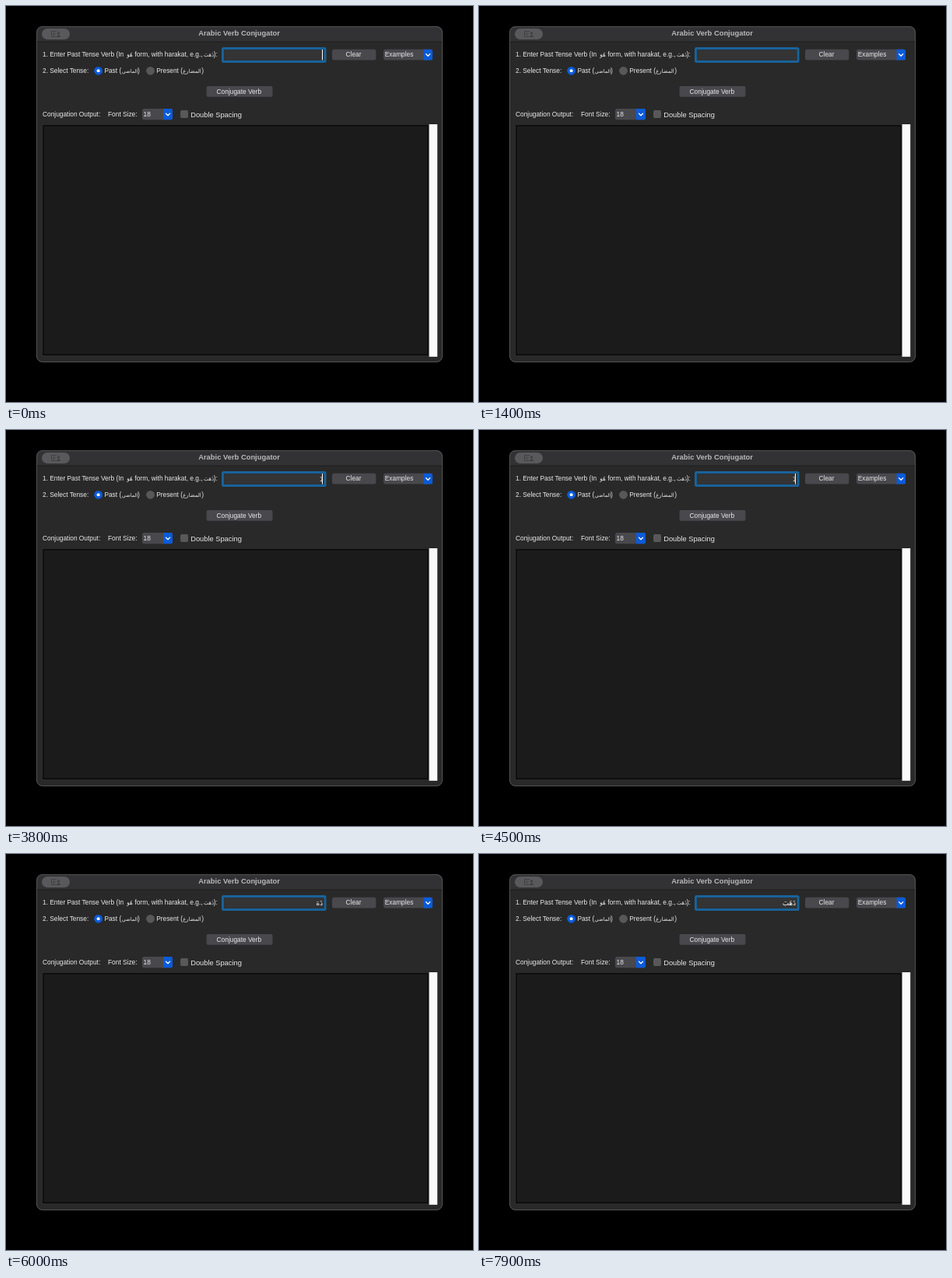
Recreate the animation shown at these times as an HTML page. Size 600x509 px, loop 8000 ms.

```html
<!DOCTYPE html>
<html lang="en">
<head>
<meta charset="utf-8">
<title>Arabic Verb Conjugator</title>
<style>
  html, body { margin: 0; width: 100%; height: 100%; overflow: hidden; background: #000; }
  svg { display: block; }
  text { font: 8.35px "Liberation Sans", Arial, sans-serif; fill: #e9e9e9; white-space: pre; }
  .title { font-size: 9.38px; font-weight: bold; fill: #b9b8ba; }
  .wide { font-size: 9.3px; }
  .ar { font-family: "DejaVu Sans", sans-serif; direction: rtl; text-anchor: middle; }
  .typed text { font: 8.7px "DejaVu Sans", sans-serif; direction: rtl; text-anchor: start; fill: #fff; }
  .button { fill: #49484d; }
  .blue { fill: #0b5bd9; }
  .off { fill: #58585a; }
  .arrow { fill: none; stroke: #fff; stroke-width: 1.3; stroke-linecap: round; stroke-linejoin: round; }
  .typed { animation: type 8s step-end infinite; }
  .caret { fill: #fff; animation: blink 8s step-end infinite; }

  /* each row of the strip is one more keystroke */
  @keyframes type {
    0% { transform: translateY(0); }
    25% { transform: translateY(-20px); }
    43.75% { transform: translateY(-40px); }
    60% { transform: translateY(-60px); }
    68.75% { transform: translateY(-80px); }
    77.5% { transform: translateY(-100px); }
    95%, 100% { transform: translateY(-120px); }
  }
  @keyframes blink {
    0%, 10%, 21.25%, 32.5%, 42.5%, 53.75%, 66.25%, 76.25%, 87.5% { opacity: 1; }
    6.25%, 17.5%, 28.75%, 38.75%, 50%, 61.25%, 72.5%, 83.75%, 95%, 100% { opacity: 0; }
  }
</style>
</head>
<body>
<svg width="600" height="509" viewBox="0 0 600 509">
  <defs>
    <clipPath id="frame"><rect x="39" y="26" width="522" height="432" rx="8"/></clipPath>
    <path id="chevron" class="arrow" d="M-2.5 -1.2L0 1.3L2.5 -1.2"/>
  </defs>

  <!-- window -->
  <g clip-path="url(#frame)">
    <rect x="39" y="26" width="522" height="432" fill="#292929"/>
    <rect x="39" y="26" width="522" height="20" fill="#323134"/>
    <rect x="39" y="45.5" width="522" height="1" fill="#1c1c1d"/>
  </g>
  <rect x="39.5" y="26.5" width="521" height="431" rx="7.5" fill="none" stroke="#515153"/>
  <rect x="46" y="29" width="36" height="14" rx="7" fill="#59585b"/>
  <g fill="none" stroke="#403f42" stroke-width=".9">
    <path d="M65 32.5H58.5V39.5H64M60 35H63.5M60 37H63"/>
    <circle cx="67.5" cy="35" r="1.2" fill="#403f42"/>
    <path d="M65 39.5Q67.5 35.8 70 39.5Z" fill="#403f42"/>
  </g>
  <text class="title" x="247.2" y="38.2">Arabic Verb Conjugator</text>

  <!-- verb row -->
  <text x="47" y="65.3">1. Enter Past Tense Verb (In</text>
  <text class="ar" x="159" y="65.3" style="font-size:7.2px">هُوَ</text>
  <text x="165.4" y="65.3">form, with harakat, e.g.,</text>
  <text class="ar" x="260.6" y="65.3" style="font-size:6.8px">ذَهَبَ</text>
  <text x="266.8" y="65.3">):</text>

  <rect x="278.5" y="54.5" width="131.5" height="17" rx="1" fill="#343434" stroke="#19639a" stroke-width="3"/>
  <rect x="280.3" y="56.3" width="127.9" height="13.4" fill="none" stroke="#28323a" stroke-width=".7"/>
  <svg x="280" y="55" width="129" height="16" overflow="hidden">
    <g class="typed">
      <text x="127" y="31">ذ</text>
      <text x="127" y="51">ذَ</text>
      <text x="127" y="71">ذَه</text>
      <text x="127" y="91">ذَهَ</text>
      <text x="127" y="111">ذَهَب</text>
      <text x="127" y="131">ذَهَبَ</text>
    </g>
  </svg>
  <rect class="caret" x="406" y="56" width="1" height="13.5"/>

  <rect class="button" x="419" y="55.8" width="56.3" height="13.7" rx="2.5"/>
  <text x="436.6" y="65.3">Clear</text>
  <rect class="button" x="485" y="55.8" width="63" height="13.7" rx="2.5"/>
  <path class="blue" d="M536.5 55.8h9a2.5 2.5 0 0 1 2.5 2.5v8.7a2.5 2.5 0 0 1 -2.5 2.5h-9z"/>
  <use href="#chevron" x="542.2" y="63"/>
  <text x="486.8" y="65.3">Examples</text>

  <!-- tense row -->
  <text x="47" y="86.2">2. Select Tense:</text>
  <circle class="blue" cx="118.6" cy="83.3" r="5.4"/>
  <circle cx="118.6" cy="83.3" r="2" fill="#fff"/>
  <text x="126.4" y="86.2">Past (</text>
  <text class="ar" x="159" y="86.2" style="font-size:6.5px">الماضي</text>
  <text x="169" y="86.2">)</text>
  <circle class="off" cx="185.5" cy="83.3" r="5.4"/>
  <text x="193.2" y="86.2">Present (</text>
  <text class="ar" x="239" y="86.2" style="font-size:6.9px">المضارع</text>
  <text x="251.2" y="86.2">)</text>

  <rect class="button" x="257.5" y="103" width="85" height="13.7" rx="2.5"/>
  <text x="270.6" y="112.6">Conjugate Verb</text>

  <!-- output row -->
  <text x="47" y="142">Conjugation Output:</text>
  <text x="131" y="142">Font Size:</text>
  <rect class="button" x="175" y="132" width="39" height="14.3" rx="2.5"/>
  <path class="blue" d="M202 132h9.5a2.5 2.5 0 0 1 2.5 2.5v9.3a2.5 2.5 0 0 1 -2.5 2.5h-9.5z"/>
  <use href="#chevron" x="208" y="139.4"/>
  <text x="176.6" y="142.2">18</text>
  <rect class="off" x="224" y="134" width="10" height="10" rx="2"/>
  <text class="wide" x="237.2" y="142.6">Double Spacing</text>

  <rect x="48" y="153.8" width="494" height="294.5" fill="#1b1b1b" stroke="#080808" stroke-width="1.3"/>
  <rect x="543.6" y="152" width="10.6" height="298.8" fill="#fafafa"/>
</svg>
</body>
</html>
```
